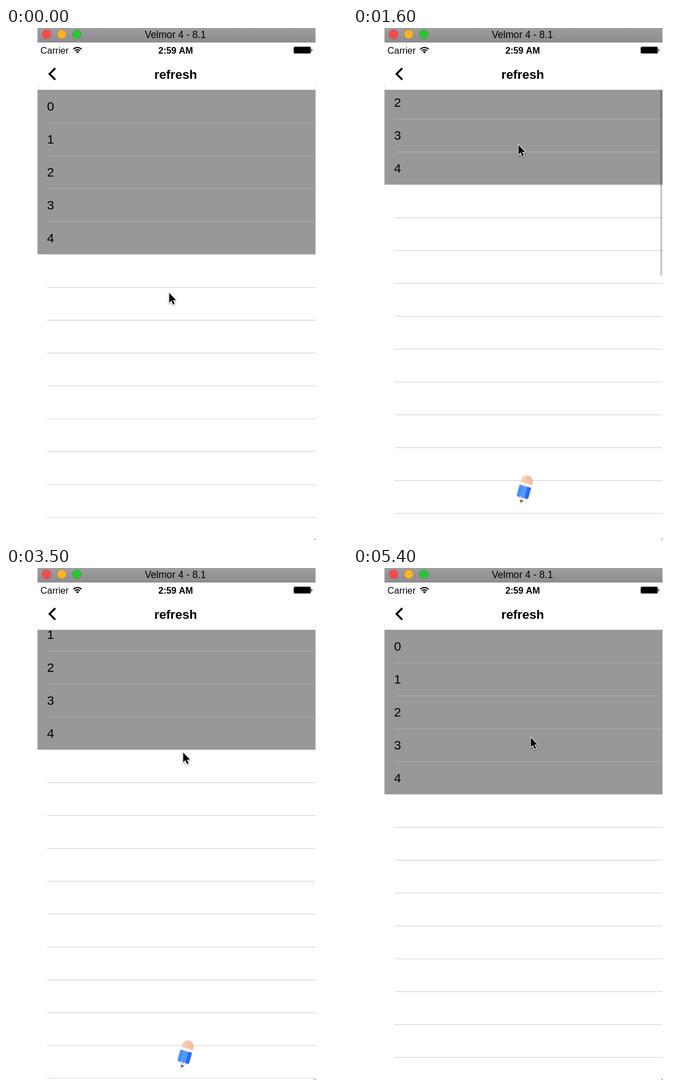
These frames come from a looping animation (611 by 917 pixels, 5.5 s). An HTML page with a canvas:

```html
<!DOCTYPE html>
<html lang="en">
<head>
<meta charset="utf-8">
<title>Pull to refresh</title>
<style>
html, body { margin: 0; height: 100%; overflow: hidden; background: #fff; }
canvas { display: block; }
</style>
</head>
<body>
<canvas id="stage" width="611" height="917"></canvas>
<script>
const ctx = document.getElementById('stage').getContext('2d');
const LOOP = 5500, STEP = 100;
const LEFT = 56.4, WIDTH = 498.2, RIGHT = LEFT + WIDTH;
const TOP = 111.1, ROW = 58.85, INDENT = 74;
const INSET = 80;
const FONT = '"Liberation Sans", Arial, sans-serif';

// The cursor drags twice, returns, then drifts away
const ORIGIN = { x: 292.5, y: 474.5 };
const MOVES = [
  { start: 0, end: 850, dx: 4, dy: -179 },
  { start: 1300, end: 1800, dx: 0, dy: -133 },
  { start: 2000, end: 2800, dx: 21, dy: 168 },
  { start: 4900, end: 5400, dx: 1, dy: -27 }
];
const [PULL, REPULL] = MOVES;
const RETURN = { start: 4100, end: 4530 };

function progress(t, { start, end }) {
  const p = Math.min(1, Math.max(0, (t - start) / (end - start)));
  return p * p * (3 - 2 * p);
}

const cursorAt = t => MOVES.reduce((c, m) => {
  const p = progress(t, m);
  return { x: c.x + m.dx * p, y: c.y + m.dy * p };
}, ORIGIN);

// Overscroll resists the finger, then decays after release
const rubberBand = d => 806 * (1 - 1 / (d * .55 / 806 + 1));
const decay = dt => Math.exp(-.0063 * dt);
const pulled = (t, move) => rubberBand(-move.dy * progress(t, move));

function overscrollAt(t) {
  if (t < PULL.end) return pulled(t, PULL);
  if (t < REPULL.start) return (pulled(t, PULL) - INSET) * decay(t - PULL.end);
  return pulled(t, REPULL) * decay(Math.max(0, t - REPULL.end));
}

function rect(x, y, w, h, color) {
  ctx.fillStyle = color;
  ctx.fillRect(x, y, w, h);
}

function roundRect(x, y, w, h, r, color) {
  ctx.fillStyle = color;
  ctx.beginPath();
  ctx.roundRect(x, y, w, h, r);
  ctx.fill();
}

function text(str, x, y, size, align = 'left', weight = 'normal') {
  ctx.font = `${weight} ${size}px ${FONT}`;
  ctx.textAlign = align;
  ctx.fillStyle = '#000';
  ctx.fillText(str, x, y);
}

function polygon(color, ...points) {
  ctx.fillStyle = color;
  ctx.beginPath();
  points.forEach(p => ctx.lineTo(...p));
  ctx.fill();
}

function gradient(x0, y0, x1, y1, from, to) {
  const g = ctx.createLinearGradient(x0, y0, x1, y1);
  g.addColorStop(0, from);
  g.addColorStop(1, to);
  return g;
}

function drawList(scroll) {
  const rowTop = k => TOP + k * ROW - scroll;
  rect(LEFT, 100, WIDTH, rowTop(5) - 100, '#989898');
  for (let k = 0; k < 5; k++) text(k, 73.6, rowTop(k) + 37.2, 22.8);
  for (let k = 1; k < 17; k++)
    rect(INDENT, rowTop(k) - .2, RIGHT - INDENT, 1, k < 5 ? '#b2b2b3' : '#cccccd');
}

function drawPencil(x, y) {
  ctx.save();
  ctx.translate(x, y);
  ctx.rotate(.27);
  polygon('#f8e3d6', [-9, 14], [9, 14], [1, 25], [-1, 25]);
  polygon('#4b4a5c', [-3.2, 21], [3.2, 21], [0, 25.5]);
  roundRect(-10.8, -25, 21.6, 16, [10.8, 10.8, 0, 0], gradient(-11, 0, 11, 0, '#f9d2be', '#efb79c'));
  rect(-10.8, -10.8, 21.6, 6, '#fbf1ea');
  ['#458ffb', '#5299ff', '#246bf8'].forEach((color, i) =>
    roundRect(-10.8 + i * 7.2, -5.2, 7.2, 21.4, [0, 0, 3, 3], color));
  ctx.restore();
}

function drawWifi(x, y) {
  const from = -Math.PI * .75, to = -Math.PI * .25;
  ctx.strokeStyle = ctx.fillStyle = '#000';
  ctx.lineWidth = 2;
  for (const r of [6.6, 10.6]) {
    ctx.beginPath();
    ctx.arc(x, y, r, from, to);
    ctx.stroke();
  }
  ctx.beginPath();
  ctx.moveTo(x, y);
  ctx.arc(x, y, 3.8, from, to);
  ctx.fill();
}

function drawBattery() {
  roundRect(515, 33, 31.7, 13.2, 3, '#777');
  roundRect(516.2, 34.2, 29.3, 10.8, 2, '#000');
  roundRect(547.2, 37.5, 1.6, 4.5, [0, 2, 2, 0], '#333');
}

function drawHeader() {
  rect(LEFT, 0, WIDTH, 111, '#fff');
  rect(LEFT, 110.5, WIDTH, .6, '#b0b0b0');
  rect(LEFT, 0, WIDTH, 25, gradient(0, 0, 0, 25, '#a09da1', '#8f8c90'));
  rect(LEFT, 25, WIDTH, .8, '#737074');
  ['#fc4a48', '#fdb424', '#29c732'].forEach((color, i) => {
    ctx.fillStyle = color;
    ctx.strokeStyle = 'rgba(0,0,0,.14)';
    ctx.lineWidth = 1;
    ctx.beginPath();
    ctx.arc(72.7 + i * 27.1, 11.3, 8.1, 0, 7);
    ctx.fill();
    ctx.stroke();
  });
  text('Velmor 4 - 8.1', 303.5, 17.8, 17.6, 'center');

  text('Carrier', 61.8, 45.6, 16.5);
  drawWifi(128, 45.6);
  text('2:59 AM', 304, 45.6, 16.2, 'center', 'bold');
  drawBattery();

  ctx.strokeStyle = '#000';
  ctx.lineWidth = 3.4;
  ctx.stroke(new Path2D('M88.3 72L78 82.3L88.3 92.6'));
  text('refresh', 304, 90.7, 22.6, 'center', 'bold');
}

function drawCursor({ x, y }) {
  const arrow = new Path2D('M0 0V17.5L4 13.8L6.8 20.6L9.6 19.4L6.8 12.7H12.2Z');
  ctx.save();
  ctx.translate(x, y);
  ctx.lineJoin = 'round';
  ctx.strokeStyle = '#fff';
  ctx.lineWidth = 2.2;
  ctx.shadowColor = 'rgba(0,0,0,.4)';
  ctx.shadowBlur = 3;
  ctx.shadowOffsetY = 1.5;
  ctx.stroke(arrow);
  ctx.shadowColor = 'transparent';
  ctx.fillStyle = '#000';
  ctx.fill(arrow);
  ctx.restore();
}

function draw(t) {
  const over = overscrollAt(t);
  const rest = t < PULL.end ? 0 : INSET * (1 - progress(t, RETURN));
  const scroll = rest + over;
  const barAlpha = Math.min(.22, (over - 2) * .02);
  const sway = t < 586 ? 0 : -18 * Math.cos((t - 2900) * .00611);

  rect(0, 0, 611, 917, '#fff');
  drawList(scroll);
  drawPencil(306 + sway, 950.5 - scroll);
  if (barAlpha > 0) roundRect(550.5, 111, 3.6, 332.5, 1.8, `rgba(0,0,0,${barAlpha})`);
  drawHeader();
  rect(553, 915, 1.5, 1.5, '#555');
  drawCursor(cursorAt(t));
}

function tick() {
  const t = performance.now() % LOOP;
  draw(Math.floor(t / STEP) * STEP);
  requestAnimationFrame(tick);
}
tick();
</script>
</body>
</html>
```
